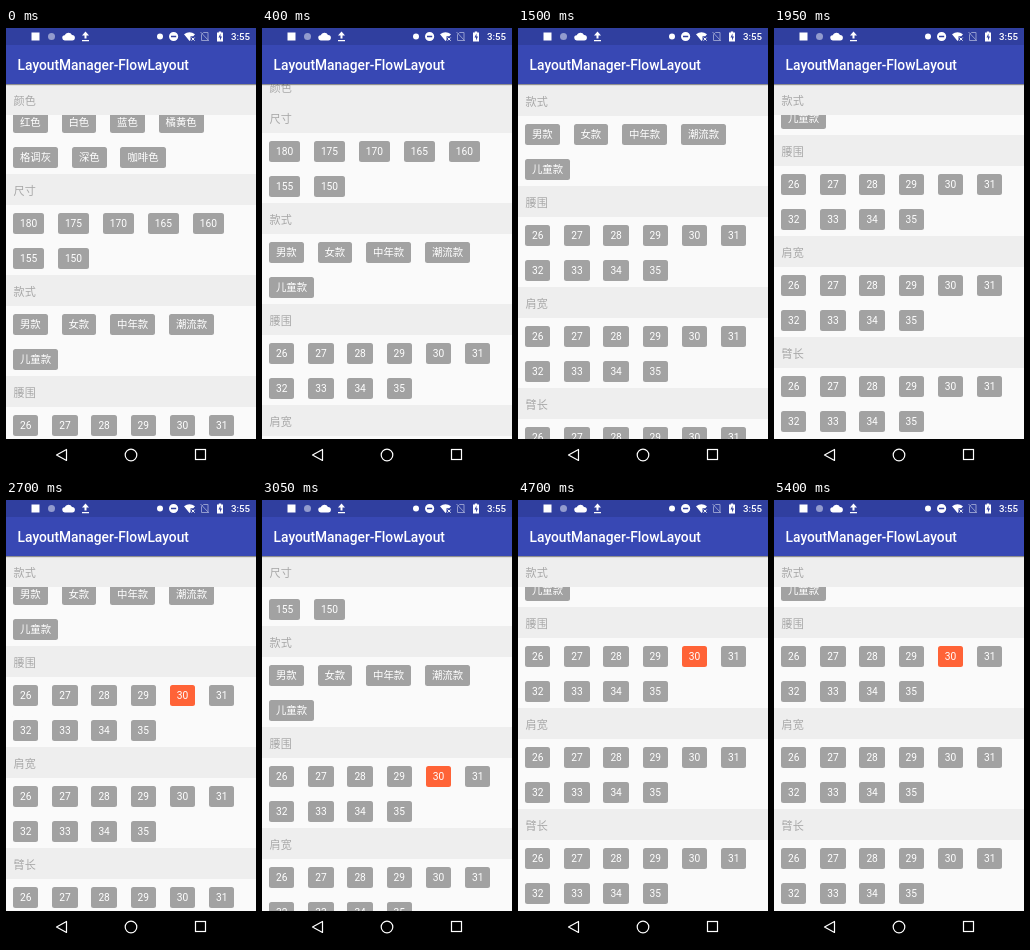
An HTML page for the animation above (5.5 s loop, 250x444 px).

```html
<!DOCTYPE html>
<html lang="zh-CN">
<head>
<meta charset="utf-8">
<title>FlowLayout</title>
<style>
  html, body { margin: 0; width: 250px; height: 444px; overflow: hidden; background: #fafafa; }
  body { position: relative; font-family: Roboto, "Noto Sans CJK SC", "Noto Sans CJK", sans-serif; }
  svg { position: absolute; left: 0; top: 0; }
  #bar {
    position: absolute; z-index: 2; top: 0; width: 250px; height: 56px; box-sizing: border-box;
    padding: 17px 0 0 11.6px; color: #fff; font: 500 13.78px/40px Roboto, sans-serif; white-space: nowrap;
    background: linear-gradient(#303f9f 17px, #3848b4 17px); box-shadow: 0 1px 1px #0006;
  }
  #clock { position: absolute; left: 225px; top: 0; font-size: 9.7px; line-height: 18px; }
  #list { position: absolute; top: 56px; width: 250px; height: 355px; overflow: hidden; }
  section { height: 101px; }
  section:last-child { height: 102px; }
  h2 {
    position: sticky; top: 0; z-index: 1; margin: 0; padding-left: 7.6px;
    height: 31px; font: 400 11.1px/35px Roboto, "Noto Sans CJK SC", "Noto Sans CJK", sans-serif;
    color: #a8a8a8; background: #eee;
  }
  .chips { display: flex; flex-wrap: wrap; gap: 14px 13.9px; padding: 8px 7px 0; }
  .chips span {
    height: 21px; padding: 0 6.95px; border-radius: 2.5px; white-space: nowrap;
    color: #fff; background: #a2a2a2; font-size: 10.4px; line-height: 21px;
  }
  .chips .number { font-size: 10.2px; }
  .chips .on { background: #ff6337; }
  #nav { position: absolute; top: 411px; width: 250px; height: 33px; background: #000; }
</style>
</head>
<body>
<div id="list"></div>
<div id="bar">LayoutManager-FlowLayout
  <svg width="250" height="17" fill="#fff">
    <rect x="25.5" y="4.5" width="8" height="8"/>
    <circle cx="45.5" cy="8.5" r="3.5" fill="#929bce"/>
    <path d="M59 12.5a2.6 2.6 0 0 1-.3-5.2 4 4 0 0 1 7.3-.4 2.8 2.8 0 0 1 .2 5.6z"/>
    <path d="M79.5 3.5l3.5 4h-2.5v3h-2v-3H76zM76 12h7v1.2h-7z"/>
    <circle cx="154" cy="8.5" r="3"/>
    <path fill-rule="evenodd" d="M163 8.5a4.6 4.6 0 1 0 9.2 0a4.6 4.6 0 1 0-9.2 0M165 7.7h5.2v1.6H165z"/>
    <path d="M178 6.3Q183.5 2.2 189 6.3L187.3 8.3H184.5V12L183.5 13z"/>
    <path d="M185.6 9.6l3 3m0-3l-3 3" stroke="#fff"/>
    <path d="M197.5 4.5h4.5v8h-6.5v-6zM194.5 4l8.5 9" fill="none" stroke="#929bce"/>
    <path d="M212.8 3.5h2.4v1h1.8v9h-6v-9h1.8z"/>
    <path d="M214.5 5.5l-2 4h1.5v3l2-4h-1.5z" fill="#303f9f"/>
  </svg>
  <span id="clock">3:55</span>
</div>
<div id="nav">
  <svg width="250" height="33" fill="none" stroke="#fff" stroke-width="1.2">
    <path d="M50.5 16L60.5 10.5V21.5z" stroke-linejoin="round"/>
    <circle cx="125" cy="16" r="5.8"/>
    <rect x="189.5" y="10.5" width="10" height="10"/>
  </svg>
</div>
<script>
const LOOP = 5500, STEP = 50;
const sizes = '26 27 28 29 30 31 32 33 34 35';
const groups = {
  颜色: '红色 白色 蓝色 橘黄色 格调灰 深色 咖啡色',
  尺寸: '180 175 170 165 160 155 150',
  款式: '男款 女款 中年款 潮流款 儿童款',
  腰围: sizes, 肩宽: sizes, 臂长: sizes
};
// Each swipe: start, end, offset to reach, ease-out power
const swipes = [
  [0, 600, 92, 2], [750, 1350, 173, 2], [1400, 1900, 252, 2],
  [2600, 3220, 122, 2], [4100, 4700, 252, 4]
];
const startOffset = 11;

const list = document.getElementById('list');
const chipHtml = item => `<span class="${isNaN(item) ? 'word' : 'number'}">${item}</span>`;
list.innerHTML = Object.entries(groups).map(([name, items]) =>
  `<section><h2>${name}</h2><div class="chips">${items.split(' ').map(chipHtml).join('')}</div></section>`
).join('');

const chip = (group, index) => list.children[group].querySelectorAll('span')[index];
const taps = [[2300, chip(3, 4)], [3550, chip(2, 1)]];

function offsetAt(time) {
  let offset = startOffset;
  for (const [start, end, target, power] of swipes) {
    const u = Math.min(1, Math.max(0, (time - start) / (end - start)));
    offset += (target - offset) * (1 - (1 - u) ** power);
  }
  return Math.round(offset);
}

function draw() {
  const time = Math.floor(performance.now() % LOOP / STEP) * STEP;
  list.scrollTop = offsetAt(time);
  for (const [at, el] of taps) el.classList.toggle('on', time >= at);
  requestAnimationFrame(draw);
}
draw();
</script>
</body>
</html>
```
